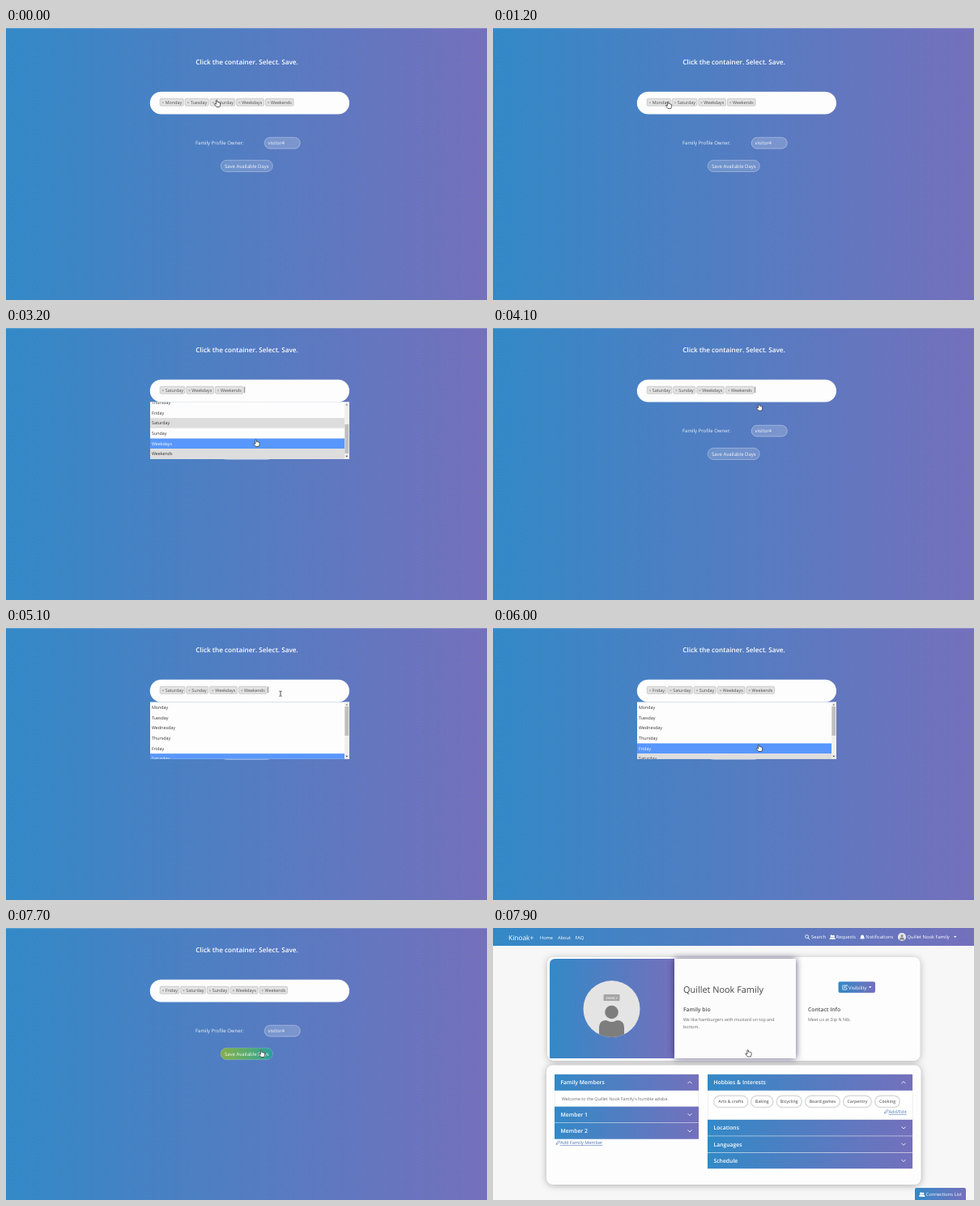
Recreate the animation shown at these times as an HTML page. Size 594 px wide and 336 px high, loop 8 s.

```html
<!DOCTYPE html>
<html lang="en">
<head>
<meta charset="utf-8">
<title>Available days</title>
<style>
  html, body { margin: 0; width: 100%; height: 100%; overflow: hidden; }
  svg { display: block; width: 594px; height: 336px; }
  text { font-family: "Open Sans", "Noto Sans", sans-serif; text-rendering: geometricPrecision; white-space: pre; }
</style>
</head>
<body>
<svg id="stage" viewBox="0 0 594 336" xmlns="http://www.w3.org/2000/svg">
  <defs>
    <linearGradient id="brand"><stop stop-color="#3389c7"/><stop offset="1" stop-color="#7470bc"/></linearGradient>
    <linearGradient id="hover"><stop stop-color="#86b04a"/><stop offset=".55" stop-color="#55ab70"/><stop offset="1" stop-color="#2a9f9f"/></linearGradient>
    <clipPath id="list"><rect x="178" y="106.5" width="246" height="70.2"/></clipPath>
    <clipPath id="avatar"><circle cx="146.5" cy="100" r="35"/></clipPath>
  </defs>
  <g id="scene"></g>
</svg>
<script>
const LOOP = 8000, STEP = 100;
const DAYS = ["Monday", "Tuesday", "Wednesday", "Thursday", "Friday", "Saturday", "Sunday", "Weekdays", "Weekends"];
const TAG_WIDTH = { Monday: 29.5, Tuesday: 29.5, Friday: 24, Saturday: 31, Sunday: 27.5, Weekdays: 34.3, Weekends: 35 };
const FAMILY = "Quillet Nook Family";
const ROW = 12.67, LIST_TOP = 106.8, LIST_BOTTOM = 176.7;

// [time, x, y]; the pointer moves linearly between stops
const POINTER = [
  [0, 261, 93], [300, 225, 93], [1100, 224, 95], [1200, 217, 95], [1400, 217, 95], [1500, 194, 93],
  [2200, 194, 93], [2300, 331, 91], [2700, 331, 91], [2800, 320, 125], [3200, 309.5, 142],
  [3600, 309, 131], [3900, 309, 131], [4200, 339, 81], [5100, 339, 81], [5800, 329, 148],
  [6700, 329, 148], [7300, 316, 155]
];
const OPEN = [[400, 800], [1500, 1800], [2600, 4100], [4600, 6300]];
const CARET = [[2300, 2800], [3200, 3700], [3900, 4400], [4900, 5400]];

const clamp = v => Math.max(0, Math.min(1, v));
const ramp = (t, from, to) => clamp((t - from) / (to - from));
const within = (t, spans) => spans.some(([a, b]) => t >= a && t < b);

function pointerAt(t) {
  const i = POINTER.findIndex(p => p[0] > t);
  if (i < 0) return POINTER.at(-1).slice(1);
  const [a, b] = [POINTER[i - 1], POINTER[i]], k = ramp(t, a[0], b[0]);
  return [1, 2].map(n => a[n] + (b[n] - a[n]) * k);
}

function isSelected(day, t) {
  switch (day) {
    case "Monday": return t < 1500;
    case "Tuesday": return t < 400;
    case "Friday": return t >= 6000;
    case "Sunday": return t >= 3900;
    default: return day === "Saturday" || day.startsWith("Week");
  }
}

const rect = (x, y, w, h, fill, extra = "") =>
  `<rect x="${x}" y="${y}" width="${w}" height="${h}" fill="${fill}" ${extra}/>`;
const text = (x, y, size, fill, str, extra = "") =>
  `<text x="${x}" y="${y}" font-size="${size}" fill="${fill}" ${extra}>${str.replace(/&/g, "&amp;")}</text>`;
const circle = (x, y, r, fill, extra = "") => `<circle cx="${x}" cy="${y}" r="${r}" fill="${fill}" ${extra}/>`;
const path = (d, fill, extra = "") => `<path d="${d}" fill="${fill}" ${extra}/>`;
const line = (d, stroke, width) => path(d, "none", `stroke="${stroke}" stroke-width="${width}"`);
const BOLD = 'font-weight="600"', MIDDLE = 'text-anchor="middle"';

const hand = (x, y) => path(
  `M${x - 1.6} ${y - 3.6}q.8-1 1.5 0v2.2q.9-.5 1.4.2.8-.3 1.2.4 1-.2 1.1.8v2.2l-.9 2.3h-3.7l-2.6-3.2q0-1.3 1-.8l1 .8z`,
  "#fff", 'stroke="#222" stroke-width=".7" stroke-linejoin="round"');
const beam = (x, y) => line(
  `M${x - 1.6} ${y - 3}h1.1l.5.5.5-.5h1.1M${x} ${y - 2.5}v5.2M${x - 1.6} ${y + 3.2}h1.1l.5-.5.5.5h1.1`, "#222", .8);

function tags(t) {
  let x = 190, out = "";
  DAYS.filter(day => isSelected(day, t)).forEach((day, i) => {
    const active = i === 0 && t >= 1500 && t < 2700;
    out += rect(x + .2, 87.2, TAG_WIDTH[day] - .4, 9, "#e2e2e2", 'rx="1.4" stroke="#aaa" stroke-width=".5"')
      + text(x + 2.5, 93.9, 5, active ? "#111" : "#8c8c8c", "×", BOLD)
      + text(x + 6.8, 93.9, 5.35, "#4c4c4c", day);
    x += TAG_WIDTH[day] + 1.5;
  });
  if (within(t, CARET)) out += rect(x - .3, 87.5, .6, 7.5, "#333");
  return { svg: out, end: x };
}

function dropdown(t, x, y) {
  const scroll = t < 4100 ? 44 * ramp(t, 2700, 3000) : 0;
  const hovering = x < 418 && y > LIST_TOP && y < LIST_BOTTOM && t > 2600;
  const marked = hovering ? Math.floor((y - LIST_TOP + scroll) / ROW) : DAYS.findIndex(day => isSelected(day, t));
  const rows = DAYS.map((day, i) => {
    const top = LIST_TOP + i * ROW - scroll;
    const fill = i === marked ? "#5897fb" : isSelected(day, t) ? "#ddd" : "#fdfdfd";
    return rect(178, top, 240, ROW, fill) + text(180, top + 8.3, 5.35, i === marked ? "#fff" : "#333", day);
  }).join("");
  return `<g clip-path="url(#list)">${rect(178, 106, 246, 71, "#fdfdfd")}${rows}</g>`
    + rect(418, 106.5, 6, 70.2, "#f0f0f0")
    + rect(418.4, 112 + scroll / 2, 4.8, 36, "#bfbfbf")
    + path("M419.4 110.4l1.4-1.6 1.4 1.6z", "#777") + path("M419.4 172.8l1.4 1.6 1.4-1.6z", "#333");
}

function formPage(t) {
  const shift = 15 * ramp(t, 2900, 3100);
  const [x, y] = pointerAt(t), localY = y + shift;
  const chosen = tags(t), hover = ramp(t, 6800, 7300);
  const overField = localY > 79 && localY < 106 && x > chosen.end;
  return rect(0, 0, 594, 336, "url(#brand)") + rect(0, 0, 594, 1, "#fff", 'opacity=".18"')
    + `<g transform="translate(0 ${-shift})">`
    + text(297.5, 45, 8.2, "#fff", "Click the container. Select. Save.", `${BOLD} ${MIDDLE}`)
    + text(234, 144.2, 6, "#eef2fb", "Family Profile Owner:")
    + rect(319.2, 135.2, 44.1, 13.8, "#fff", 'fill-opacity=".2" rx="6.9" stroke="#fff" stroke-opacity=".5" stroke-width=".7"')
    + text(323.5, 144.2, 6, "#f3f5fb", "visitor4")
    + rect(265.2, 163.3, 64.1, 14.2, "#fff", 'fill-opacity=".17" rx="7.1" stroke="#fff" stroke-opacity=".45" stroke-width=".7"')
    + rect(265.2, 163.3, 64.1, 14.2, "url(#hover)", `rx="7.1" opacity="${hover}"`)
    + text(297.3, 172.5, 6, "#f3f5fb", "Save Available Days", MIDDLE)
    + rect(177.8, 78.8, 246.2, 27.7, "#fdfdfd", 'rx="13.8"')
    + chosen.svg + (within(t, OPEN) ? dropdown(t, x, localY) : "")
    + "</g>" + (overField ? beam(x, y) : hand(x, y));
}

const chevron = (x, y, up) => line(`M${x - 2.5} ${y + (up ? 1.3 : -1.3)}l2.5 ${up ? -2.6 : 2.6} 2.5 ${up ? 2.6 : -2.6}`, "#fff", .8);
const header = (x, y, w, h, label, open) =>
  rect(x, y, w, h, "url(#brand)") + text(x + 7.5, y + h / 2 + 2.5, 6.8, "#fff", label, BOLD) + chevron(x + w - 11, y + h / 2, open);
const link = (x, y, label) => line(`M${x - 5} ${y}l.5-1.7 3-3 1.2 1.2-3 3z`, "#5277b5", .7)
  + text(x, y, 5.6, "#5277b5", label, 'text-decoration="underline"');
const person = (x, y) => circle(x, y - 1.3, 1.4, "#fff") + path(`M${x - 2.5} ${y + 2.5}q0-2.4 2.5-2.4t2.5 2.4z`, "#fff");
const people = (x, y) => person(x - .8, y) + person(x + 1.7, y + .2);
const caretDown = (x, y) => path(`M${x - 1.8} ${y - 1}h3.6l-1.8 2z`, "#fff");
const panel = (x, y, w, h, fill, shadow, extra = "") => rect(x, y, w, h, fill, `style="filter:drop-shadow(${shadow})" ${extra}`);

function profilePage(t) {
  const lift = ramp(t, 7600, 7900);
  const hobbies = [["Arts & crafts", 272, 43.5], ["Baking", 318, 28.5], ["Bicycling", 349.5, 32.5],
    ["Board games", 385, 44], ["Carpentry", 432, 36], ["Cooking", 471, 32]];
  return rect(0, 0, 594, 336, "#f7f7f7") + rect(0, 0, 594, 22, "url(#brand)")
    + text(19, 14.8, 8.4, "#fff", "Kinoak+")
    + text(58, 13.7, 5.65, "#fff", "Home") + text(80, 13.7, 5.65, "#fff", "About") + text(101.5, 13.7, 5.65, "#fff", "FAQ")
    + circle(387.6, 10.6, 2, "none", 'stroke="#fff" stroke-width=".8"') + line("M389 12l2.3 2.3", "#fff", .9)
    + text(393, 13.2, 5.75, "#fff", "Search")
    + people(418.7, 11.3) + text(423.5, 13.2, 5.75, "#fff", "Requests")
    + path("M453 13.2q1.1-.8 1.1-2.7 0-2 2-2t2 2q0 1.900 1.100 2.700zM455.300 13.700h1.600l-.8.9z", "#fff")
    + text(460.3, 13.2, 5.75, "#fff", "Notifications")
    + circle(505, 11, 5.1, "#e6e6e6") + circle(505, 9.8, 1.5, "#888") + path("M502 14.500q0-3 3-3t3 3z", "#888")
    + text(511.5, 13.2, 5.75, "#fff", FAMILY) + caretDown(570.7, 11)

    + panel(67, 36, 460.5, 128, "#fdfdfd", "0 1px 4px rgba(0,0,0,.25)", 'rx="8"')
    + path("M70 161V45q0-7 7-7h147v123z", "url(#brand)")
    + circle(146.5, 100, 35, "#e4e4e4")
    + `<g clip-path="url(#avatar)">${circle(146.5, 104, 8.3, "#7d7d7d")}${path("M131 135V123q0-9 9-9 6.500 4 13 0 9 0 9 9v12z", "#7d7d7d")}</g>`
    + rect(136.5, 82, 20, 8, "#a5a5a5", 'rx="1"') + text(146.5, 87.5, 4, "#eee", "FAMILY", `${BOLD} ${MIDDLE}`)
    + panel(224, 38, 150, 123, "#fcfcfd", `0 0 ${1 + 3 * lift}px rgba(40,30,90,${.75 * lift})`)
    + text(235, 79.8, 10.9, "#444", FAMILY, 'font-weight="500"')
    + text(235, 103, 6.8, "#555", "Family bio", BOLD)
    + text(235, 115.3, 5.35, "#6a6a6a", "We like hamburgers with mustard on top and")
    + text(235, 123.7, 5.35, "#6a6a6a", "bottom.")
    + rect(426.5, 66.3, 45.5, 13.7, "url(#brand)", 'rx="2"')
    + line("M435.500 71h-3.700v5h5v-2.500M433.700 74l.3-1.300 2.700-2.700 1 1-2.700 2.700z", "#fff", .7)
    + text(439, 75.5, 5.9, "#fff", "Visibility") + caretDown(465.7, 73.3)
    + text(389, 103, 6.8, "#555", "Contact Info", BOLD)
    + text(389, 115.3, 5.35, "#6a6a6a", "Meet us at Dip N Nib.")

    + panel(66, 169.5, 462.500, 147.5, "#fdfdfd", "0 1px 4px rgba(0,0,0,.3)", 'rx="8"')
    + rect(76.2, 181, 177.6, 79, "#fff", 'stroke="#ddd" stroke-width=".5"')
    + header(76, 180.8, 178, 20, "Family Members", true)
    + text(85, 212.700, 5.35, "#6a6a6a", "Welcome to the Quillet Nook Family's humble adobe.")
    + header(76, 220.6, 178, 19.7, "Member 1") + header(76, 240.7, 178, 20, "Member 2")
    + link(83, 267.400, "Add Family Member")

    + rect(265.2, 181, 252.8, 116, "#fff", 'stroke="#ddd" stroke-width=".5"')
    + header(265, 180.8, 253, 20, "Hobbies & Interests", true)
    + hobbies.map(([name, x, w]) =>
        rect(x + .7, 207.2, w - 1.4, 14.3, "#fff", 'rx="7.1" stroke="#d9dada" stroke-width="1.5"')
        + text(x + w / 2, 216.300, 5.2, "#6a6a6a", name, `${BOLD} ${MIDDLE}`)).join("")
    + link(488.5, 229, "Add/Edit")
    + header(265, 236.800, 253, 19.900, "Locations") + header(265, 257.200, 253, 19.900, "Languages")
    + header(265, 277.600, 253, 19.600, "Schedule")
    + rect(521, 321, 63, 17, "url(#brand)", 'rx="2"') + people(529.3, 329.2)
    + text(534.5, 331.300, 5.8, "#fff", "Connections List")
    + hand(315.5, 154.5);
}

const scene = document.getElementById("scene");
let shown = -1;
function tick() {
  const t = Math.floor(performance.now() % LOOP / STEP) * STEP;
  if (t !== shown) {
    scene.innerHTML = t < 7800 ? formPage(t) : profilePage(t);
    shown = t;
  }
  requestAnimationFrame(tick);
}
tick();
</script>
</body>
</html>
```
